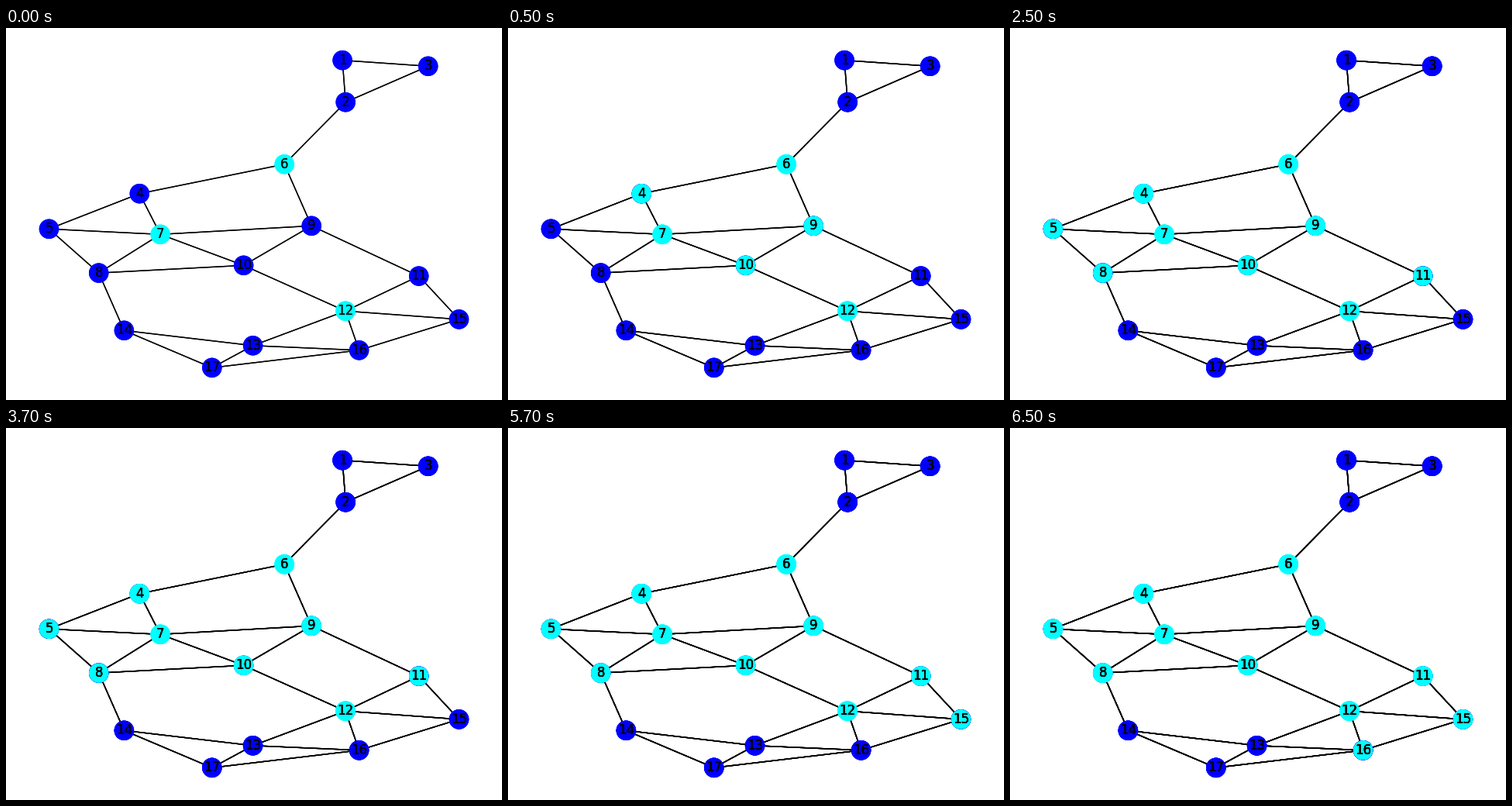
Animation of 640x480 px, one loop 8000 ms. Source, as a matplotlib script:

```python
import matplotlib.pyplot as plt
from itertools import pairwise
from matplotlib.animation import FuncAnimation
from matplotlib.collections import LineCollection

WIDTH, HEIGHT, DPI = 640, 480, 100
INTERVAL, STEP_MS, START_MS, LOOP_MS = 500, 2000, 1500, 8000
STEPS = 5

# Pixel position of node 1, 2, 3, ...
POINTS = [
    (434.1, 41.65), (438.2, 95.7), (544.7, 49.3), (172.3, 213.7), (55.5, 259.3),
    (359.2, 175.8), (199.2, 266.3), (119.7, 316.1), (394.2, 255.3),
    (306.6, 306.3), (532.7, 320.1), (438.0, 365.2), (318.6, 409.8),
    (152.4, 390.3), (584.5, 375.9), (455.6, 415.8), (265.8, 438.35),
]
NODES = dict(enumerate(POINTS, start=1))

# The outline and the trails that cross its inside
TRAILS = [
    (2, 1, 3, 2, 6, 4, 5, 8, 14, 17, 16, 15, 11, 9, 6),
    (4, 7, 9, 10, 8, 7, 5), (7, 10, 12, 11), (15, 12, 16, 13, 14), (12, 13, 17),
]
EDGES = [edge for trail in TRAILS for edge in pairwise(trail)]
SEEDS = {6, 7, 12}

fig = plt.figure(figsize=(WIDTH / DPI, HEIGHT / DPI), dpi=DPI, facecolor="white")
ax = fig.add_axes([0, 0, 1, 1])
ax.set_xlim(0, WIDTH)
ax.set_ylim(HEIGHT, 0)
ax.axis("off")


def spread(active):
    """Activate every node that has at least two active neighbours."""
    def support(node):
        return sum(node in edge and bool(active & (set(edge) - {node}))
                   for edge in EDGES)
    return active | {node for node in NODES if support(node) >= 2}


def draw_graph(active):
    """Draw the whole graph once and return its artists."""
    segments = [(NODES[a], NODES[b]) for a, b in EDGES]
    edges = LineCollection(segments, colors="black", linewidths=1, zorder=1)
    ax.add_collection(edges, autolim=False)
    colors = ["cyan" if node in active else "blue" for node in NODES]
    dots = ax.scatter(*zip(*POINTS), s=300, c=colors, linewidths=1, zorder=2)
    labels = [
        ax.text(x, y, str(node), size=12, family="DejaVu Sans",
                ha="center", va="center", zorder=3)
        for node, (x, y) in NODES.items()
    ]
    return [edges, dots, *labels]


# Each step paints over the previous ones, so edges and labels grow heavier
active = SEEDS
layers = [draw_graph(active) + draw_graph(active)]
for _ in range(STEPS - 1):
    active = spread(active)
    layers.append(draw_graph(active))


def update(frame):
    step = (frame * INTERVAL + START_MS) // STEP_MS
    for level, artists in enumerate(layers):
        for artist in artists:
            artist.set_visible(level <= step)
    return [artist for artists in layers for artist in artists]


anim = FuncAnimation(fig, update, frames=LOOP_MS // INTERVAL,
                     interval=INTERVAL, repeat=True, repeat_delay=0)
plt.show()
```
